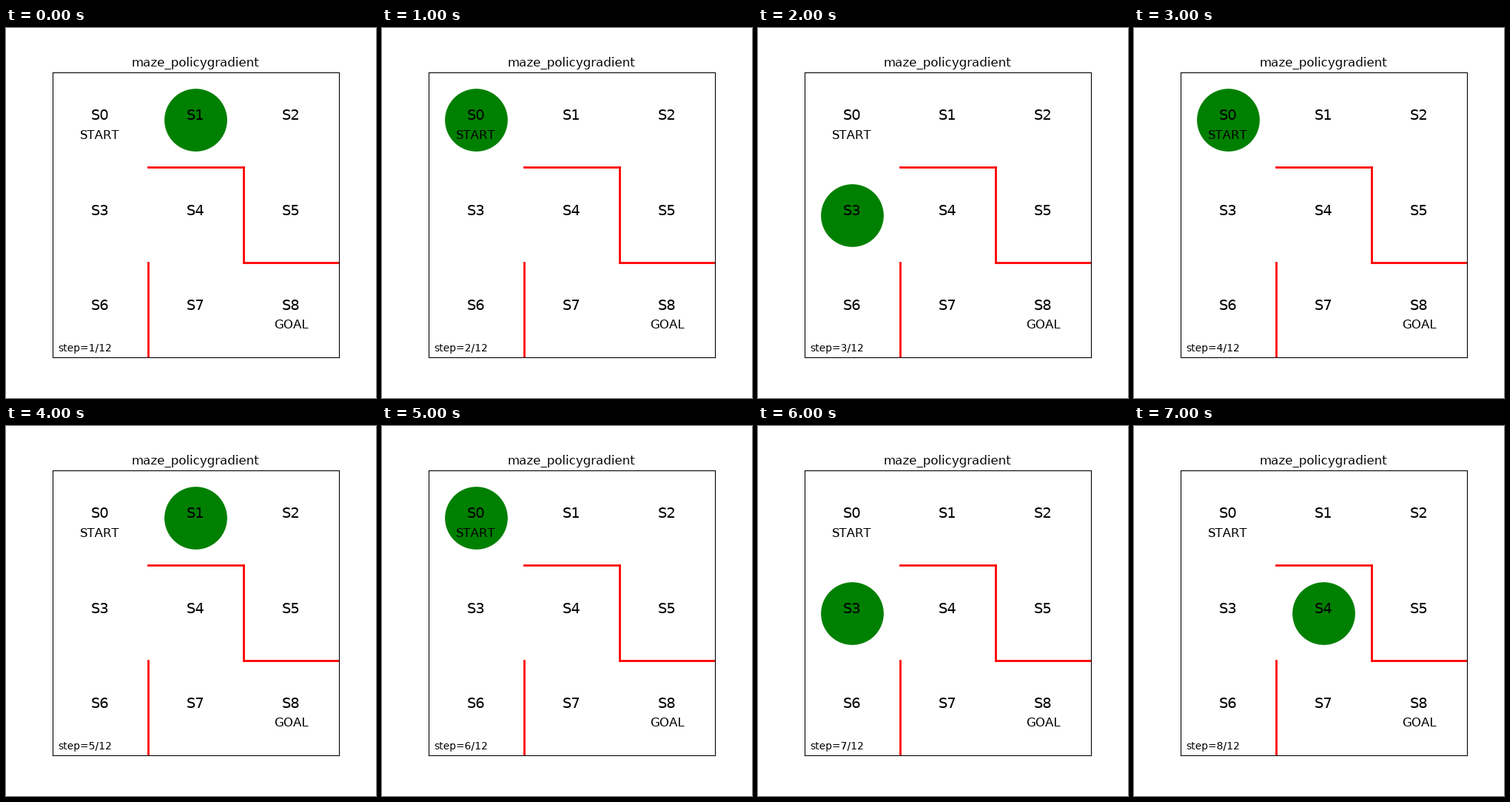
A matplotlib script that plays this animation: 500x500 px, repeating every 8000 ms.

```python
from itertools import accumulate, pairwise

import matplotlib.pyplot as plt
from matplotlib.animation import FuncAnimation

MOVES = "RLDURLDR"  # walk from the start cell, one move per step
SHIFT = {"R": 1, "L": -1, "D": 3, "U": -3}
TOTAL_STEPS = 12
WALLS = [
    [(1, 0), (1, 1)],
    [(1, 2), (2, 2), (2, 1), (3, 1)],
]


def cell_center(state):
    row, col = divmod(state, 3)
    return col + 0.5, 2.5 - row


plt.rcParams.update({
    "font.family": "DejaVu Sans",
    "text.hinting": "native",
    "text.kerning_factor": 6,
})
fig = plt.figure(figsize=(5, 5), dpi=100)
ax = fig.add_subplot()
ax.set(xlim=(0, 3), ylim=(0, 3), xticks=[], yticks=[])
ax.set_title("maze_policygradient", fontsize=12)

for wall in WALLS:
    for ends in pairwise(wall):
        ax.plot(*zip(*ends), color="red", linewidth=2)

for state in range(9):
    ax.text(*cell_center(state), f"S{state}", size=14, ha="center")
ax.text(0.5, 2.3, "START", size=12, ha="center")
ax.text(2.5, 0.3, "GOAL", size=12, ha="center")

step_label = ax.text(0.02, 0.02, "", size=10, transform=ax.transAxes)
agent, = ax.plot([], [], "o", color="green", markersize=60)
path = list(accumulate(SHIFT[move] for move in MOVES))


def update(i):
    x, y = cell_center(path[i])
    agent.set_data([x], [y])
    step_label.set_text(f"step={i + 1}/{TOTAL_STEPS}")
    return agent, step_label


anim = FuncAnimation(fig, update, frames=len(path), interval=1000,
                     repeat=True, repeat_delay=0)
plt.show()
```
